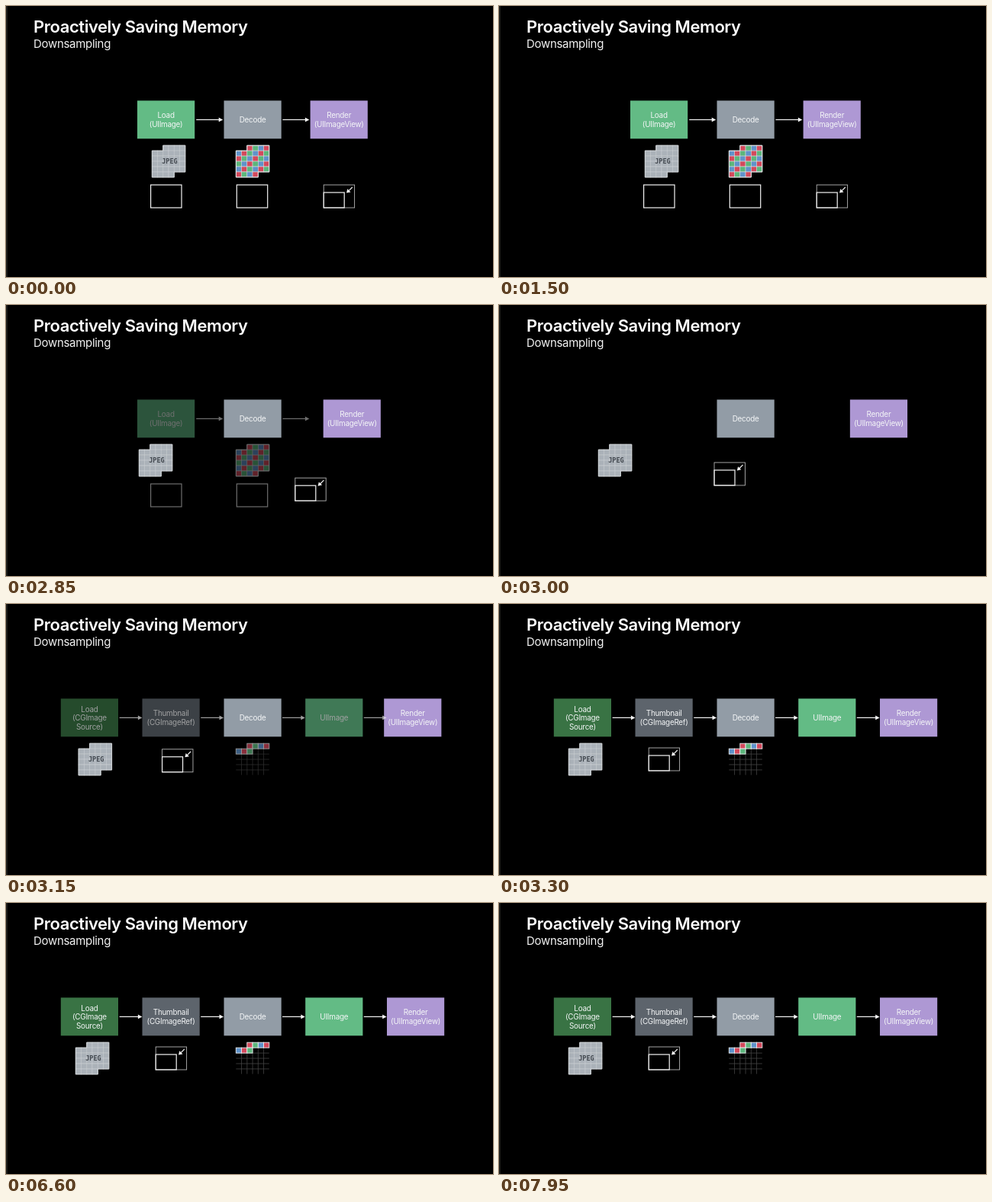
Animation, 638 px wide and 356 px high, one loop 8 s. Source, as an HTML page:

```html
<!DOCTYPE html>
<html lang="en">
<head>
<meta charset="utf-8">
<title>Downsampling</title>
<style>
  @property --move { syntax: "<number>"; inherits: true; initial-value: 0; }
  @property --before { syntax: "<number>"; inherits: true; initial-value: 1; }
  @property --after { syntax: "<number>"; inherits: true; initial-value: 0; }

  html, body { margin: 0; width: 100%; height: 100%; overflow: hidden; background: #000; }
  svg { display: block; width: 100%; height: 100%; animation: rearrange 8s step-end infinite; }

  /* The slide moves on a 150 ms beat */
  @keyframes rearrange {
    0%      { --move: 0;    --before: 1;   --after: 0; }
    35.625% { --move: .17;  --before: .45; --after: 0; }
    37.5%   { --move: .61;  --before: 0;   --after: 0; }
    39.375% { --move: .962; --before: 0;   --after: .65; }
    41.25%, 100% { --move: 1; --before: 0; --after: 1; }
  }
  .before { opacity: var(--before); }
  .after { opacity: var(--after); }
  .jpeg { transform: translate(calc(var(--move) * -100px), 0); }
  .resize { transform: translate(calc(var(--move) * -220px), calc(var(--move) * -46px)); }
  .render { transform: translate(calc(var(--move) * 100.4px), 0); }

  text { font-family: Inter, "Open Sans", sans-serif; fill: #fff; }
  .title { font-size: 22px; font-weight: 600; letter-spacing: -.02em; }
  .subtitle { font-size: 15px; letter-spacing: -.02em; fill: #f2f2f2; }
  .label { font-size: 9.9px; letter-spacing: -.025em; text-anchor: middle; fill: #f4f6f7; }
  .format { font: bold 8.5px "DejaVu Sans Mono", monospace; text-anchor: middle; fill: #42484f; }
  .line { fill: none; stroke: #f4f4f4; stroke-width: 1.2; }
  .thin { fill: none; stroke: #b4b4b4; stroke-width: .9; }
  .head { fill: #f4f4f4; }
</style>
</head>
<body>
<svg viewBox="0 0 638 356">
  <rect width="638" height="356"/>
  <rect width="2" height="356" fill="#1e1e1b"/>
  <text class="title" x="36" y="34.6">Proactively Saving Memory</text>
  <text class="subtitle" x="36" y="54.8">Downsampling</text>

  <g id="old" class="before">
    <rect class="line" x="189.6" y="235" width="40.4" height="30"/>
    <rect class="line" x="302.3" y="235" width="40.4" height="30"/>
  </g>
  <g id="decode"></g>
  <g id="new" class="after"></g>
  <g id="render" class="render"></g>
  <g id="jpeg" class="jpeg"></g>
  <g class="resize">
    <rect class="thin" x="416.2" y="235" width="40.4" height="30"/>
    <rect class="line" x="416.2" y="245" width="27" height="20"/>
    <path class="line" d="M453.8 238 L448.2 243.6"/>
    <path class="head" d="M446 245.6 L447.3 240.2 L451.5 244.4Z"/>
  </g>
  <g id="oldArrows" class="before"></g>
  <g id="newArrows" class="after"></g>
</svg>
<script>
  const NS = "http://www.w3.org/2000/svg";
  const CELL_W = 7.25, CELL_H = 6.95, SIZE = 6;
  const GREEN = "#63bb85", GRAY = "#929ca6";
  const PIXELS = ["#d4495c", "#5cb67b", "#5f93cb"];
  const group = id => document.getElementById(id);

  function add(parent, name, attrs, text) {
    const el = document.createElementNS(NS, name);
    for (const key in attrs) el.setAttribute(key, attrs[key]);
    if (text) el.textContent = text;
    parent.append(el);
  }

  function box(parent, x, fill, ...lines) {
    add(parent, "rect", { x, y: 124.3, width: 75.2, height: 50, fill });
    const top = 153.3 - (lines.length - 1) * 5.85;
    lines.forEach((line, i) =>
      add(parent, "text", { class: "label", x: x + 37.6, y: top + i * 11.7 }, line));
  }

  function arrow(parent, from, to) {
    add(parent, "path", { class: "line", "stroke-width": 1.3, d: `M${from} 149.4H${to - 4}` });
    add(parent, "path", { class: "head", d: `M${to} 149.4l-5.5 -2.9v5.8Z` });
  }

  // A square grid missing its top-left and bottom-right corners
  const inShape = (c, r) => !(r === 0 && c < 2) && !(r === SIZE - 1 && c > 3);

  function tiles(parent, x, y, count, style) {
    for (let r = 0; r < SIZE; r++)
      for (let c = 0; c < SIZE; c++)
        if (inShape(c, r) && count-- > 0)
          add(parent, "rect", {
            x: x + c * CELL_W, y: y + r * CELL_H, width: CELL_W, height: CELL_H, ...style(c, r)
          });
  }

  function outline(parent, x, y, stroke) {
    const w = CELL_W, h = CELL_H;
    add(parent, "path", {
      fill: "none", stroke,
      d: `M${x + 2 * w} ${y}h${4 * w}v${5 * h}h${-2 * w}v${h}h${-4 * w}v${-5 * h}h${2 * w}Z`
    });
  }

  const pixel = (c, r) => ({
    fill: PIXELS[(c + r + 1) % 3], stroke: "#d9dce0", "stroke-width": .6
  });

  box(group("old"), 172, GREEN, "Load", "(UIImage)");
  tiles(group("old"), 301.3, 183.2, 36, pixel);
  outline(group("old"), 301.3, 183.2, "#eceef0");

  box(group("decode"), 285.5, GRAY, "Decode");
  box(group("render"), 398.6, "#ae98d4", "Render", "(UIImageView)");

  const fresh = group("new");
  box(fresh, 71.8, "#397344", "Load", "(CGImage", "Source)");
  box(fresh, 178.5, "#5d646c", "Thumbnail", "(CGImageRef)");
  box(fresh, 392.2, GREEN, "UIImage");
  for (let i = 1; i < SIZE; i++) {
    const x = 301.3 + i * CELL_W, y = 183.2 + i * CELL_H;
    add(fresh, "path", { stroke: "#444", "stroke-width": .8, d: `M${x} 190.2V224.6` });
    if (i > 1) add(fresh, "path", { stroke: "#444", "stroke-width": .8, d: `M301.3 ${y}H344.8` });
  }
  tiles(fresh, 301.3, 183.2, 7, (c, r) => ({ ...pixel(c, r), stroke: "#eceef0", "stroke-width": .9 }));

  const jpeg = group("jpeg");
  tiles(jpeg, 191.3, 183.2, 36, () => ({ fill: "#abb2b9", stroke: "#c5cacf", "stroke-width": .7 }));
  outline(jpeg, 191.3, 183.2, "#d3d7da");
  add(jpeg, "text", { class: "format", x: 214.4, y: 207.4 }, "JPEG");

  for (const x of [249.2, 362.4]) arrow(group("oldArrows"), x, x + 35);
  for (const x of [148.6, 255.2, 362, 468.8]) arrow(group("newArrows"), x, x + 29.8);
</script>
</body>
</html>
```
